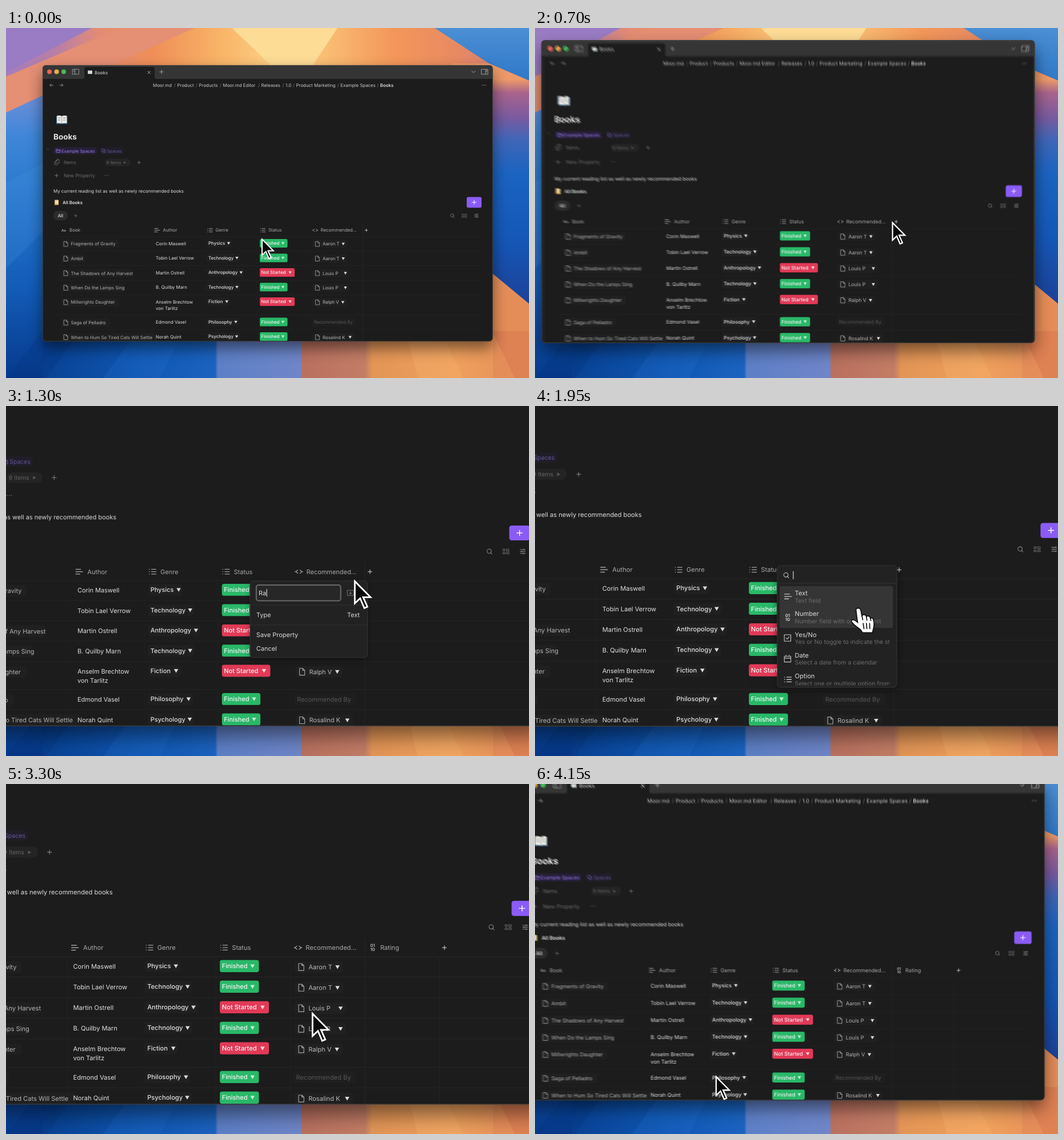
Recreate the animation shown at these times as an HTML page. Size 915 px wide and 612 px high, loop 4.2 s.

```html
<!DOCTYPE html>
<html lang="en">
<head>
<meta charset="utf-8">
<title>Books</title>
<style>
html, body { margin: 0; width: 915px; height: 612px; overflow: hidden; background: #1c1c1c; }
svg { display: block; }
text { font-family: Inter, Roboto, sans-serif; text-rendering: geometricPrecision; white-space: pre; }
.line { fill: none; stroke-linecap: round; stroke-linejoin: round; }
</style>
</head>
<body>
<svg id="stage" width="915" height="612" viewBox="0 0 915 612"></svg>
<script>
const LOOP = 4200, CX = 614.5, CY = 518, SIZE = 7.9, COPIES = 5, STEP = 2.5;

// Drawing helpers; text y is the middle of the capitals.
const text = (x, y, s, fill = '#dcdcdc', o = {}) => {
  const size = o.size || SIZE;
  return `<text x="${x}" y="${y + size * 0.36}" font-size="${size}" font-weight="${o.weight || 400}" fill="${fill}"` +
    `${o.anchor ? ` text-anchor="${o.anchor}"` : ''}${o.id ? ` id="${o.id}"` : ''}>${s}</text>`;
};
const box = (x, y, w, h, fill, r = 0, extra = '') =>
  `<rect x="${x}" y="${y}" width="${w}" height="${h}" rx="${r}" fill="${fill}" ${extra}/>`;
const line = (d, color, w = 0.8, x = 0, y = 0) =>
  `<path class="line" transform="translate(${x} ${y})" d="${d}" stroke="${color}" stroke-width="${w}"/>`;
const dot = (x, y, r, fill) => `<circle cx="${x}" cy="${y}" r="${r}" fill="${fill}"/>`;
const poly = (points, fill) => `<polygon points="${points}" fill="${fill}"/>`;
const plus = (x, y, color, r = 2.6, w = 0.9) => line(`M${-r} 0H${r}M0 ${-r}V${r}`, color, w, x, y);
const down = (x, y, color = '#dcdcdc') => poly(`${x - 2.7},${y - 2.1} ${x + 2.7},${y - 2.1} ${x},${y + 2.5}`, color);
const dots = (x, y, color) => [-2.8, 0, 2.8].map(d => dot(x + d, y, 0.7, color)).join('');
const page = (x, y, color = '#a8a8a8') => line('M0 0H4L6.5 2.5V8.6H0ZM4 0V2.5H6.5', color, 0.8, x, y - 4.3);
const list = (x, y, color = '#a0a0a0') => line('M0 -3h.3M0 0h.3M0 3h.3M2.8 -3H8.5M2.8 0H8.5M2.8 3H8.5', color, 0.9, x, y);
const lines = (x, y, color = '#a0a0a0') => line('M0 -3H6M0 0H8.5M0 3H5', color, 1, x, y);
const search = (x, y, color) => line('M1.8 1.8L3.3 3.3M2.4 -.4A2.7 2.7 0 1 1 -3 -.4A2.7 2.7 0 1 1 2.4 -.4', color, 0.8, x, y);
const digits = (x, y, color) =>
  text(x, y - 2.5, '01', color, { size: 5.4, weight: 700, anchor: 'middle' }) +
  text(x, y + 2.5, '10', color, { size: 5.4, weight: 700, anchor: 'middle' });
const gradient = (id, vertical, stops, y1 = 0, y2 = 612) =>
  `<linearGradient id="${id}" gradientUnits="userSpaceOnUse" x1="0" x2="${vertical ? 0 : 915}" y1="${vertical ? y1 : 0}" y2="${vertical ? y2 : 0}">` +
  stops.split(' ').map(s => { const [c, o] = s.split('@'); return `<stop offset="${o}" stop-color="${c}"/>`; }).join('') +
  '</linearGradient>';

function wallpaper() {
  return '<defs>' +
    gradient('sky', false, '#a57cba@0 #b97fa4@.1 #e48c74@.18 #ef8e58@.28 #f8b467@.41 #fdd489@.53 #f9bb72@.62 #f3975a@.74 #e88a62@.86 #c97a7c@1') +
    gradient('left', true, '#6f8fd8@0 #3f86d8@.15 #2474cc@.4 #125ab6@.7 #063a8c@1', 115, 612) +
    gradient('right', true, '#ee9a68@0 #a8648c@.06 #7a5aa0@.17 #3f66b8@.27 #1b64c0@.42 #1558b8@.7 #1c4299@1', 90, 480) +
    gradient('blue', true, '#4b8fd4@0 #2f78c8@1', 0, 95) +
    gradient('floor', false, '#063985@0 #0a479c@.12 #0f57b2@.26 #1b63bf@.4 #5c7fc6@.405 #6f86c8@.563 #b9705f@.567 #c27d66@.686 #e39556@.7 #eea05c@.86 #e58d59@1') +
    '<filter id="blur" x="-20%" y="-20%" width="140%" height="150%"><feGaussianBlur stdDeviation="13"/></filter></defs>' +
    box(0, 0, 915, 612, 'url(#sky)') +
    poly('0,0 150,0 0,78', '#9a7cc4') +
    poly('0,85 200,0 330,0 64,118 0,148', '#e58f74') +
    poly('395,0 580,0 520,90 490,90', '#fddc96') +
    poly('0,148 64,118 380,300 380,612 0,612', 'url(#left)') +
    poly('0,270 90,225 90,330 0,420', '#4f97e033') +
    poly('750,0 915,0 915,92 845,62', 'url(#blue)') +
    poly('780,62 845,62 915,92 915,540 780,540', 'url(#right)') +
    poly('780,370 840,420 915,482 915,612 780,612', '#e58d59') +
    box(64, 530, 788, 82, 'url(#floor)') +
    poly('64,530 130,530 70,612 0,612', '#04307433') +
    poly('230,530 310,530 270,612 170,612', '#2a76d033') +
    poly('700,530 760,530 800,612 720,612', '#f4ad6a66') +
    poly('850,530 915,530 915,612 890,612', '#cf6a4a55');
}

function chrome() {
  const crumbs = [[257, 'Moor.md'], [299.5, 'Product'], [337.5, 'Products'], [379.5, 'Moor.md Editor'], [446.5, 'Releases'],
    [489, '1.0'], [507.5, 'Product Marketing'], [585, 'Example Spaces'], [654.5, 'Books']];
  const book = (x, y, k) => `<g transform="translate(${x} ${y}) scale(${k})">` +
    '<path d="M-9.5 -6.5H9.5V7.2H-9.5Z" fill="#4b7fa8"/><path d="M-8.6 -7Q-4 -8.5 0 -6.3Q4 -8.5 8.6 -7V5.8Q4 4.8 0 6.6Q-4 4.8 -8.6 5.8Z" fill="#f1efe9"/>' +
    '<path d="M0 -6.3V6.6M-6.8 -4H-2M-6.8 -1.5H-2M-6.8 1H-2M2 -4H6.8M2 -1.5H6.8M2 1H6.8" stroke="#8e8e8e" stroke-width=".8"/></g>';
  let s = box(64, 65, 787.5, 483, '#1c1c1c', 6) +
    '<path d="M64 89V71Q64 65 70 65H845.5Q851.5 65 851.5 71V89Z" fill="#353535"/>' +
    '<path d="M134 89Q137 89 137 86V72Q137 68 141 68H256Q260 68 260 72V86Q260 89 263 89Z" fill="#1c1c1c"/>' +
    dot(76, 76.5, 4, '#f0655b') + dot(88.5, 76.5, 4, '#efad4e') + dot(101, 76.5, 4, '#45b95c') +
    line('M0 0H11V8.6H0ZM4 0V8.6M1.4 2H2.6M1.4 4H2.6', '#a8a8a8', 0.8, 116.5, 72.2) +
    book(147, 77.5, 0.42) + text(155, 77.7, 'Books', '#dcdcdc') +
    line('M-2.3 -2.3L2.3 2.3M2.3 -2.3L-2.3 2.3', '#c4c4c4', 0.9, 250.3, 77.7) + plus(272, 76.7, '#a8a8a8', 3.2) +
    line('M-3 -1.5L0 1.5L3 -1.5', '#b0b0b0', 0.9, 818, 76.7) +
    line('M0 0H11V8.6H0ZM7 0V8.6M8.4 2H9.6M8.4 4H9.6', '#a8a8a8', 0.9, 832, 72.2) +
    line('M3 0H-3L-.6 -2.4M-3 0L-.6 2.4', '#9a9a9a', 0.9, 79.7, 100) +
    line('M-3 0H3L.6 -2.4M3 0L.6 2.4', '#9a9a9a', 0.9, 96.7, 100) + dots(836, 100, '#a8a8a8');
  crumbs.forEach(([x, name], i) => {
    const last = i === crumbs.length - 1;
    s += text(x, 100.2, name, last ? '#f0f0f0' : '#c9c9c9', { weight: last ? 500 : 400 });
    if (i) s += text(x - 4, 100.2, '/', '#777', { anchor: 'middle' });
  });
  return s + book(97.7, 160.5, 1) + text(83, 190, 'Books', '#e4e4e4', { size: 13.5, weight: 700 });
}

function header() {
  return line('M-2.5 -1.2L0 1.2L2.5 -1.2', '#555', 0.8, 73, 212) +
    box(83, 208.5, 76, 12.5, '#272038', 5) + line('M0 0H2.5L3.5 1H6.5V5.5H0ZM0 2.4H6.5', '#9b7bf0', 0.8, 88.3, 212) +
    text(97, 214.8, 'Example Spaces', '#9b7bf0', { size: 7.5 }) +
    box(164, 208.5, 42, 12.5, '#211e29', 5) + line('M0 0H4V4H0ZM2 4V6H6V2H4', '#65559a', 0.8, 168, 211.8) +
    text(176.5, 214.8, 'Spaces', '#65559a', { size: 7.5 }) +
    line('M0 2.5L2.5 0H6V6H0ZM0 2.5H2.5V0M-2 4V9H3.5V8', '#777', 0.8, 87, 230) +
    text(101, 235, 'Items', '#707070', { size: 8.3 }) + box(173, 228.5, 45, 13.5, '#242424', 6) +
    text(175.5, 235.2, '9 Items', '#656565', { size: 7.4 }) + poly('206,233 206,237.6 210,235.3', '#555') + plus(232.7, 235.2, '#777') +
    plus(88.5, 258, '#777', 3) + text(101, 258.2, 'New Property', '#6c6c6c', { size: 8.45 }) + dots(176, 257.7, '#666') +
    text(83, 285, 'My current reading list as well as newly recommended books') +
    '<g id="hover">' + box(309.2, 280, 0.8, 9.5, '#e8e8e8') +
    [71.4, 74].map(x => [302, 304.7, 307.4].map(y => dot(x, y, 0.6, '#777')).join('')).join('') + plus(73, 319, '#c8c8c8', 3.6, 1) + '</g>' +
    box(85, 300.5, 7, 9, '#e4bd62', 1) + box(86.7, 301.5, 4.8, 6.2, '#f3dda0') + box(84.6, 308, 5, 1.6, '#b98a3c', 0.6) +
    text(99, 305.2, 'All Books', '#e4e4e4', { weight: 600, size: 7.8 }) +
    box(806, 295.5, 26, 18.7, '#8a5cf5', 3) + plus(819, 304.8, '#fff', 3.4, 1) +
    box(82.5, 319.8, 25.5, 16.4, '#2c2c2c', 8) + text(95.2, 328.2, 'All', '#e0e0e0', { anchor: 'middle', weight: 500 }) +
    plus(122, 328.2, '#666') + search(781, 328.2, '#858585') +
    line('M0 0H2.5V2H0ZM0 4H2.5V6H0ZM4.5 0H7.5V2.4H4.5ZM4.5 4H7.5V6H4.5Z', '#707070', 0.7, 798.2, 325.2) +
    line('M0 -2.4H6.4M0 0H6.4M0 2.4H6.4M4.4 -3.2V-1.6M2 -.8V.8M4.4 1.6V3.2', '#858585', 0.8, 819.8, 328.2);
}

const rows = [
  [376.4, 'Fragments of Gravity', 'Corin Maswell', 'Physics', 389.5, 1, 'Aaron T', 590],
  [402, 'Ambit', 'Tobin Lael Verrow', 'Technology', 404, 1, 'Aaron T', 590],
  [427.5, 'The Shadows of Any Harvest', 'Martin Ostrell', 'Anthropology', 411.3, 0, 'Louis P', 593.8],
  [453, 'When Do the Lamps Sing', 'B. Quilby Marn', 'Technology', 404, 1, 'Louis P', 593.8],
  [478.4, 'Millwrights Daughter', 'Anselm Brechtow|von Tarlitz', 'Fiction', 386.3, 0, 'Ralph V', 589.3],
  [514, 'Saga of Pelladro', 'Edmond Vasel', 'Philosophy', 402, 1, '', 0],
  [539.5, 'When to Hum So Tired Cats Will Settle', 'Norah Quint', 'Psychology', 403.5, 1, 'Rosalind K', 602]
];

function table() {
  const head = '#a9a9a9', y = 353.6, rule = '#272727';
  let s = [364.8, 390, 415.5, 441, 466.9, 502, 527.3].map(v => line(`M84 ${v}H832`, rule, 0.7)).join('') +
    [254.6, 346.8, 439, 531.5].map(x => line(`M${x} 365V547.5`, '#222', 0.7)).join('') + line('M624 343V547.5', rule, 0.7) +
    text(97, y, 'Aa', head, { size: 6, weight: 600 }) + text(111, y, 'Book', head) +
    lines(260, y) + text(274.5, y, 'Author', head) + list(352.5, y) + text(366.5, y, 'Genre', head) +
    list(445, y) + text(459, y, 'Status', head) +
    line('M2.8 -2L.4 0L2.8 2M5.6 -2L8 0L5.6 2M-.6 0H.4M8 0H9', head, 0.9, 536.8, y) + text(550.5, y, 'Recommended...', head) +
    '<g id="add">' + plus(630.5, y, '#bdbdbd', 2.4) + '</g>' +
    '<g id="column">' + digits(633.6, y, head) + text(643, y, 'Rating', head) + line('M716.3 365V547.5', rule, 0.7) + '</g>';
  for (const [v, name, author, genre, arrow, done, by, byArrow] of rows) {
    const label = done ? 'Finished' : 'Not Started', w = done ? 48.5 : 61;
    s += box(97, v - 6, 22 + name.length * 3.95, 14.4, '#202020', 3) + page(101.5, v + 1.2) + text(113.5, v + 1.2, name, '#b4b4b4');
    author.split('|').forEach((a, i) => s += text(262, v + 0.6 + i * 11.4, a, '#e0e0e0'));
    s += box(350.5, v - 7, arrow - 345, 14.4, '#202020', 3) + text(354, v, genre, '#e0e0e0', { weight: 500 }) + down(arrow, v) +
      box(444, v - 7.5, w, 15, done ? '#29b868' : '#e13a57', 2.6) +
      text(446.6, v, label, '#f4f4f4', { weight: 500 }) + down(444 + w - 8, v, done ? '#c2f0d3' : '#ffd9df');
    s += by ? box(536.5, v - 5.8, byArrow - 529.5, 14, '#202020', 3) + page(541.8, v + 1.2) + text(554, v + 1.2, by, '#b8b8b8') + down(byArrow, v + 1.2)
      : box(535, v - 6.5, 78, 14, '#1f1f1f', 3) + text(538.7, v + 0.4, 'Recommended By', '#565656');
  }
  return s;
}

function panels() {
  const edge = 'stroke="#343434" stroke-width=".8"', shade = 'opacity=".35" filter="url(#soft)"';
  const rule = y => line(`M480 ${y}H627`, '#323232', 0.7);
  const options = [['Text', 'Text field'], ['Number', 'Number field with optional unit'], ['Yes/No', 'Yes or No toggle to indicate the state'],
    ['Date', 'Select a date from a calendar'], ['Option', 'Select one or multiple option from a list']];
  const icons = [y => lines(488.3, y, '#c8c8c8'), y => digits(492, y, '#c8c8c8'),
    y => line('M-4 -4H4V4H-4ZM-1.8 0L-.4 1.4L2 -1.4', '#c8c8c8', 0.8, 492, y),
    y => line('M-4 -3H4V4H-4ZM-4 -.8H4M-2 -4.5V-3M2 -4.5V-3', '#c8c8c8', 0.8, 492, y), y => list(488.3, y, '#c8c8c8')];
  return '<defs><filter id="soft"><feGaussianBlur stdDeviation="4"/></filter>' +
    '<clipPath id="cut"><rect x="480" y="371" width="138.5" height="126"/></clipPath></defs>' +
    '<g id="panel">' + box(479.5, 368, 148, 97, '#000', 4, shade) + box(479.5, 365.3, 148, 96.4, '#222', 4, edge) +
    box(487.3, 370.4, 106.4, 19.8, '#272727', 2.8, 'stroke="#686868" stroke-width="1.5"') +
    text(490.3, 380.3, 'Name', '#686868', { id: 'hint' }) + text(490.3, 380.3, '', '#e0e0e0', { id: 'typed' }) +
    box(490.3, 375.4, 0.8, 9.6, '#e8e8e8', 0, 'id="caret"') +
    line('M-4 -3H4V3.5H-4ZM0 -1.6V1.8M-1.4 .5L0 1.9L1.4 .5', '#6c6c6c', 0.8, 606, 380) + rule(395.6) +
    text(487.3, 408.2, 'Type') + text(617.7, 408.2, 'Text', '#dcdcdc', { id: 'type', anchor: 'end' }) + rule(420.8) +
    text(487.3, 433.4, 'Save Property') + text(487.3, 450.3, 'Cancel') + '</g>' +
    '<g id="menu">' + box(479.3, 352, 148.3, 151, '#000', 4, shade) + box(479.3, 348.4, 148.3, 151.1, '#222', 4, edge) +
    search(490.3, 360.4, '#b8b8b8') + box(498.7, 355.4, 0.8, 10, '#e0e0e0') + rule(370.4) +
    box(482.1, 373.9, 140.6, 51.8, '#353535', 2) + options.map(([name, note], i) => {
      const y = 382.5 + i * 25.75;
      return icons[i](y + 4.3) + text(501, y, name) + `<g clip-path="url(#cut)">${text(501, y + 9.1, note, '#6c6c6c', { size: 7.4 })}</g>`;
    }).join('') + '</g>';
}

function pointer() {
  return '<g id="cursor"><path id="arrow" d="M1 2.4V30.2L7.7 23.9L13 36.2L16.8 34.5L11.5 22.5H20.8Z" fill="#080808" stroke="#fff" stroke-width="2"/>' +
    '<g id="hand"><path d="M-3 2Q-3 -.5 0 -.5Q2.5 -.5 3 2L4.5 9Q6 7 8.5 8Q9.5 8.5 10 10Q12 8.5 14 10Q14.7 10.5 15 12Q17 11 18.5 13Q20 17 19.5 21Q19 25 17.5 30L5 30Q3.5 26 -1 23.5Q-6 20 -8.5 16.5Q-9 13.5 -6 14Q-3.5 14.5 -1 17Z" fill="#fff" stroke="#111" stroke-width="1.3"/>' +
    line('M4.5 9L5.5 14M10 10L10.7 14.5M15 12L15.6 15M6 18.5L7 25M10 18.5L10.6 25M14 18.5L14.2 25', '#111', 1.2) + '</g></g>';
}

const stage = document.getElementById('stage');
stage.innerHTML = wallpaper() +
  '<g id="shadow">' + box(64, 77, 787.5, 483, '#000', 8, 'opacity=".5" filter="url(#blur)"') + '</g>' +
  '<g id="copy0"><g id="win">' + chrome() + header() + table() + panels() +
  box(64.3, 65.3, 786.9, 482.4, 'none', 6, 'stroke="#4a4a4a" stroke-width=".7"') + '</g></g>' +
  Array.from({ length: COPIES - 1 }, (_, i) => `<use id="copy${i + 1}" href="#win" opacity="${1 / (i + 2)}"/>`).join('') +
  '<g id="lens">' + pointer() + '</g>';

const get = id => document.getElementById(id);
const show = (id, on) => get(id).setAttribute('display', on ? 'inline' : 'none');
const place = (id, value) => get(id).setAttribute('transform', value);

const spring = ms => { const k = Math.max(0, ms) * 0.00635; return 1 - (1 + k) * Math.exp(-k); };
const zoom = t => 1 + 0.41 * (spring(t - 556) - spring(t - 3835));
const view = s => `translate(${CX * (1 - s)} ${CY * (1 - s)}) scale(${s})`;

// Cursor path: time, x, y.
const moves = [[0, 447, 367], [250, 448, 367], [400, 455, 366], [720, 631, 353], [900, 635.5, 350.8], [1100, 633, 352],
  [1300, 610.5, 363.2], [1600, 606, 405], [1800, 604, 407], [1950, 580, 401.7], [2120, 560, 408], [2300, 556, 411],
  [2600, 540, 434], [2900, 541, 435], [3300, 558.1, 432.9], [3550, 500, 460], [3850, 395, 500], [4150, 358.3, 510.3], [4200, 356, 511]];

function cursorAt(t) {
  let i = 0;
  while (i < moves.length - 2 && moves[i + 1][0] <= t) i++;
  const a = moves[i], b = moves[i + 1], span = b[0] - a[0], u = (t - a[0]) / span;
  const slope = (j, k) => {
    const p = moves[Math.max(0, j - 1)], q = moves[Math.min(moves.length - 1, j + 1)];
    return (q[k] - p[k]) / (q[0] - p[0]) * span;
  };
  return [1, 2].map(k => {
    const u2 = u * u, u3 = u2 * u;
    return (2 * u3 - 3 * u2 + 1) * a[k] + (u3 - 2 * u2 + u) * slope(i, k) + (3 * u2 - 2 * u3) * b[k] + (u3 - u2) * slope(i + 1, k);
  });
}

const keys = [1190, 1270, 1380, 1450, 1520, 1600];
const within = (t, a, b) => t >= a && t < b;

function draw(t) {
  const s = zoom(t), moving = Math.abs(s - zoom(t - 12)) > 0.0012;
  const saved = t >= 2760, hand = within(t, 1840, 2780);
  show('hover', within(t, 250, 700));
  show('panel', within(t, 780, 2760));
  show('menu', within(t, 1800, 2220));
  show('column', saved);
  place('add', `translate(${saved ? 92.2 : 0} 0)`);

  const word = 'Rating'.slice(0, keys.filter(k => t >= k).length);
  get('typed').textContent = word;
  show('hint', !word);
  get('caret').setAttribute('x', 490.3 + (word && !saved ? get('typed').getComputedTextLength() + 0.3 : 0));
  get('type').textContent = t < 2220 ? 'Text' : 'Number';

  // Short exposure: averaged copies of the window while it zooms.
  for (let i = 0; i < COPIES; i++) {
    place('copy' + i, view(zoom(t - i * STEP)));
    if (i) show('copy' + i, moving);
  }
  place('shadow', view(s));
  place('lens', view(s));
  place('cursor', `translate(${cursorAt(t).join(' ')})`);
  show('arrow', !hand);
  show('hand', hand);
}

const start = performance.now();
function tick() {
  draw((performance.now() - start) % LOOP);
  requestAnimationFrame(tick);
}
tick();
</script>
</body>
</html>
```
